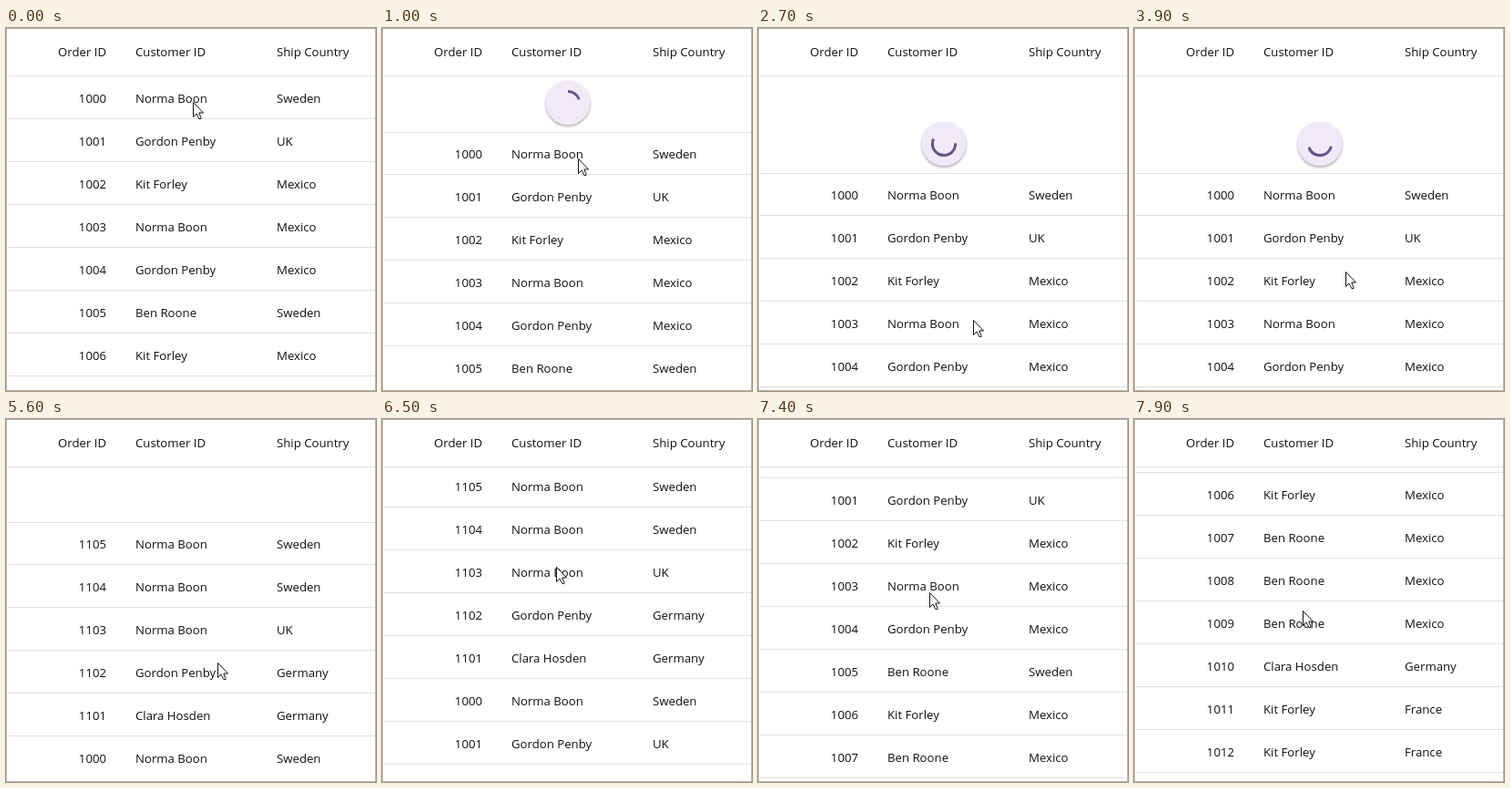
Write an HTML page with a canvas that moves like this. It is 406 px wide and 398 px high and loops after 8000 ms.

```html
<!DOCTYPE html>
<html lang="en">
<head>
<meta charset="utf-8">
<title>Pull to refresh grid</title>
<style>
  html, body { margin: 0; width: 100%; height: 100%; overflow: hidden; background: #fff; }
  canvas { display: block; width: 406px; height: 398px; }
</style>
</head>
<body>
<canvas id="stage"></canvas>
<script>
const W = 406, H = 398, LOOP = 8000, TICK = 100;
const HEAD = 53, FOOT = 394, ROW = 47;
const RELEASE = 2420, LOADED = 5470, REST = 106;

const canvas = document.getElementById('stage');
const dpr = window.devicePixelRatio || 1;
canvas.width = W * dpr;
canvas.height = H * dpr;
const ctx = canvas.getContext('2d');
ctx.scale(dpr, dpr);

const norma = 'Norma Boon', gordon = 'Gordon Penby', kit = 'Kit Forley',
      ben = 'Ben Roone', clara = 'Clara Hosden';

const baseRows = [
  [1000, norma, 'Sweden'], [1001, gordon, 'UK'], [1002, kit, 'Mexico'],
  [1003, norma, 'Mexico'], [1004, gordon, 'Mexico'], [1005, ben, 'Sweden'],
  [1006, kit, 'Mexico'], [1007, ben, 'Mexico'], [1008, ben, 'Mexico'],
  [1009, ben, 'Mexico'], [1010, clara, 'Germany'], [1011, kit, 'France'],
  [1012, kit, 'France'], [1013, norma, 'UK']
];
const newRows = [
  [1105, norma, 'Sweden'], [1104, norma, 'Sweden'], [1103, norma, 'UK'],
  [1102, gordon, 'Germany'], [1101, clara, 'Germany']
];
const allRows = newRows.concat(baseRows);

// Pointer path: time, x, y
const path = [
  [0, 205, 81], [100, 205, 78], [200, 205, 74], [300, 205, 74], [400, 205, 72],
  [600, 205, 72], [1500, 227, 232], [2350, 236, 320], [2750, 236, 320],
  [3300, 232, 267], [5900, 232, 267], [6200, 191, 161], [6450, 191, 161],
  [6900, 191, 169], [7900, 185, 210]
];

const clamp = v => Math.max(0, Math.min(1, v));
const rad = deg => deg * Math.PI / 180;

function pointer(t) {
  let i = 1;
  while (i < path.length - 1 && path[i][0] < t) i++;
  const [t0, x0, y0] = path[i - 1], [t1, x1, y1] = path[i];
  const p = clamp((t - t0) / (t1 - t0));
  return [x0 + (x1 - x0) * p, y0 + (y1 - y0) * p];
}

function pullOffset(t) {
  if (t < RELEASE) return Math.max(0, pointer(t)[1] - 82);
  if (t < LOADED) {
    const left = 1 - clamp((t - RELEASE) / 240);
    return REST + (238 - REST) * left * left;
  }
  return REST * (1 - clamp((t - LOADED) / 300));
}

const scrollTop = t => 511 * Math.pow(clamp((t - 6450) / 1450), 1.508);

function rule(y) {
  ctx.fillStyle = '#e0e0e0';
  ctx.fillRect(2, y, W - 3, 1);
}

function cells(y, [id, name, country]) {
  ctx.fillStyle = '#101010';
  ctx.textAlign = 'right';
  ctx.fillText(id, 110, y);
  ctx.textAlign = 'left';
  ctx.fillText(name, 142, y);
  ctx.fillText(country, 297, y);
}

function spinner(t, pull) {
  const x = 204, y = HEAD + pull - 32;
  ctx.save();
  ctx.shadowColor = 'rgba(0,0,0,0.35)';
  ctx.shadowBlur = 3 * dpr;
  ctx.shadowOffsetY = 1.5 * dpr;
  ctx.fillStyle = '#f1e9f7';
  ctx.beginPath();
  ctx.arc(x, y, 24.3, 0, Math.PI * 2);
  ctx.fill();
  ctx.restore();

  let from = -90, sweep = pull * 1.2;
  if (t >= RELEASE) {
    const dt = t - 2700;
    sweep = 145 + 100 * Math.sin(rad(39 + dt * 0.27));
    from = 101 + dt * 0.289 - sweep / 2;
  }
  ctx.strokeStyle = '#625587';
  ctx.lineWidth = 3;
  ctx.beginPath();
  ctx.arc(x, y, 12.6, rad(from), rad(from + sweep));
  ctx.stroke();
}

function arrow(x, y) {
  const pts = [[0, 0], [0, 16], [3.5, 12.5], [6.3, 18], [8.5, 18], [8.5, 17], [6.3, 11.5], [11, 11.5]];
  ctx.beginPath();
  pts.forEach(([dx, dy]) => ctx.lineTo(x + 0.5 + dx, y + 0.5 + dy));
  ctx.closePath();
  ctx.fillStyle = '#fff';
  ctx.fill();
  ctx.strokeStyle = '#111';
  ctx.lineWidth = 1;
  ctx.stroke();
}

function draw(t) {
  const pull = Math.round(pullOffset(t));
  const shift = pull - scrollTop(t);
  const rows = t < LOADED ? baseRows : allRows;

  ctx.fillStyle = '#fff';
  ctx.fillRect(0, 0, W, H);
  ctx.font = '13.2px "Open Sans", "Noto Sans", sans-serif';
  ctx.textBaseline = 'alphabetic';

  ctx.save();
  ctx.beginPath();
  ctx.rect(0, HEAD, W, FOOT - HEAD);
  ctx.clip();
  if (pull > 0) rule(HEAD + pull);
  rows.forEach((row, i) => {
    const y = HEAD + i * ROW + shift;
    if (y > FOOT || y + ROW < HEAD) return;
    cells(y + 29, row);
    rule(y + ROW - 1);
  });
  if (pull > 0 && t < LOADED) spinner(t, pull);
  ctx.restore();

  cells(31, ['Order ID', 'Customer ID', 'Ship Country']);
  rule(HEAD - 1);
  ctx.strokeStyle = '#b0b0b0';
  ctx.lineWidth = 1;
  ctx.strokeRect(0.5, 0.5, W - 1, H - 1);

  const [px, py] = pointer(t);
  arrow(Math.round(px), Math.round(py));
}

const start = performance.now();
function loop() {
  const t = (performance.now() - start) % LOOP;
  draw(Math.floor(t / TICK) * TICK);
  requestAnimationFrame(loop);
}
loop();
</script>
</body>
</html>
```
